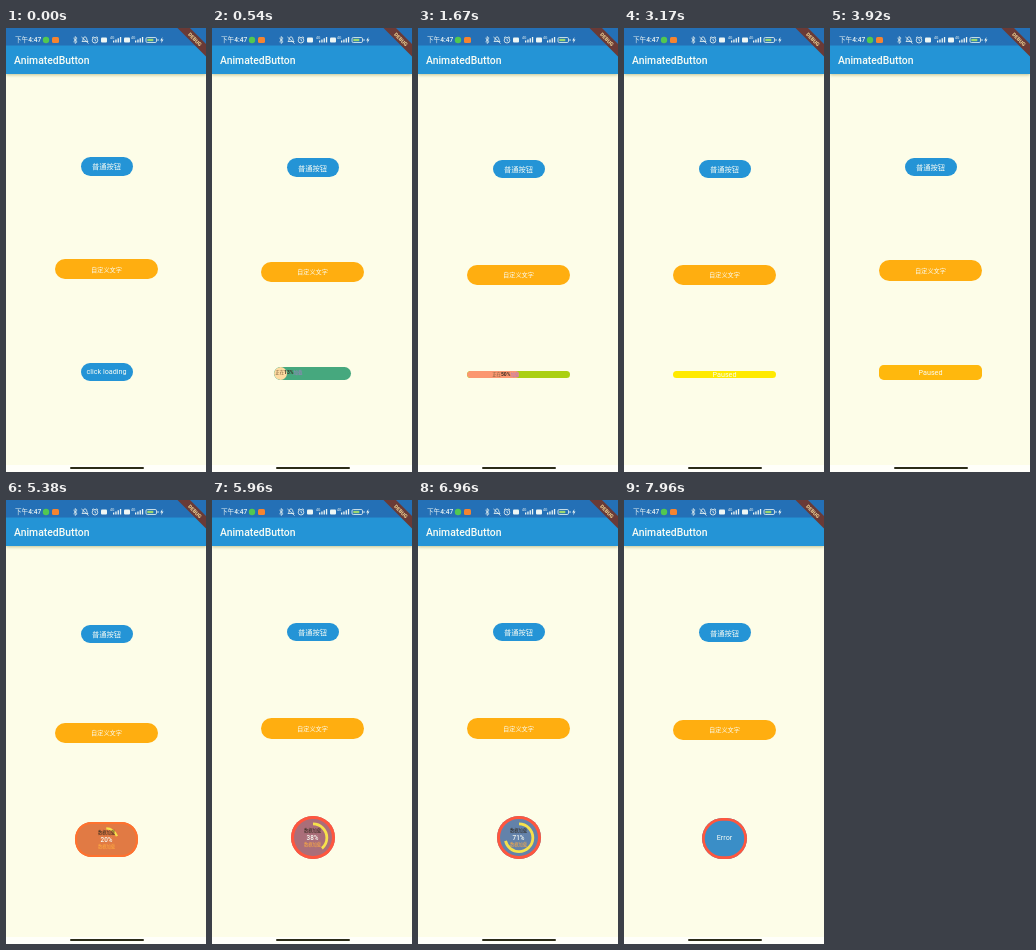
Animation of 200 by 444 pixels, one loop 8000 ms. Source, as an HTML page:

```html
<!DOCTYPE html>
<html lang="zh">
<head>
<meta charset="utf-8">
<title>AnimatedButton</title>
<style>
  html, body { margin: 0; width: 100%; height: 100%; overflow: hidden; }
  body { position: relative; background: #fdfde8; color: #f8fcf4;
    font-family: Roboto, "Noto Sans CJK SC", "Noto Sans CJK", sans-serif; }
  .bar { position: absolute; inset: 0 0 auto; height: 46px; background: #2494d6;
    box-shadow: 0 1px 3px #9a9c5899; }
  .bar svg { position: absolute; left: 0; top: 0; }
  h1 { position: absolute; left: 8px; top: 25.5px; margin: 0;
    font: 500 10.4px/14px Roboto, sans-serif; white-space: nowrap; }
  .column { position: absolute; left: 1.5px; top: 45.6px; width: 198px; height: 391px;
    display: flex; flex-direction: column; align-items: center; justify-content: space-evenly; }
  .button { position: relative; flex: none; display: grid; place-items: center;
    overflow: hidden; white-space: nowrap; }
  .plain { width: 52px; height: 18.5px; border-radius: 10px; background: #2494d6; font-size: 7.3px; }
  .custom { width: 103px; height: 20.5px; border-radius: 11px; background: #ffae10; font-size: 6.2px; }
  .label { position: absolute; left: 50%; top: 50%; transform: translate(-50%, -50%); font-size: 7.2px; line-height: 1; }
  .bar-view, .ring-view { position: absolute; inset: 0; }
  .fill { position: absolute; left: 0; top: 0; height: 100%; border-radius: 9px; }
  .caption { position: absolute; top: 50%; transform: translateY(-50%); font-size: 4.4px; line-height: 1; }
  .caption b { font-size: 5px; color: #382c20; }
  .ring-view svg { position: absolute; width: 100%; height: 100%; }
  .ring-view span { position: absolute; left: 50%; top: 50%; transform: translate(-50%, -50%); line-height: 1; }
  .nav { position: absolute; inset: auto 0 0; height: 7px; background: #fffffa; }
  .nav::after { content: ""; position: absolute; left: 64px; top: 2px; width: 74px; height: 2px;
    border-radius: 1px; background: #2c2c18; }
</style>
</head>
<body>
<div class="bar">
  <svg width="200" height="46" fill="none" stroke="#eef6f4" stroke-width=".8">
    <rect width="200" height="17.5" fill="#2470b6" stroke="none"/>
    <g fill="#eef6f4" stroke="none" font-family="Roboto, 'Noto Sans CJK SC', 'Noto Sans CJK', sans-serif">
      <text x="9" y="14.4" font-size="6.6" font-weight="500">下午4:47</text>
      <text x="104" y="11" font-size="3.5">4G</text>
      <text x="125" y="11" font-size="3.5">4G</text>
      <rect x="95" y="9.5" width="6" height="5" rx="1"/>
      <rect x="118" y="9.5" width="6" height="5" rx="1"/>
      <path id="signal" d="M107 14.5v-2h1.3v2zm2.3 0v-3h1.3v3zm2.3 0v-4.2h1.3v4.2zm2.3 0V9h1.3v5.5z"/>
      <use href="#signal" x="22"/>
      <path d="M156.5 9l-2.3 3.4h1.5l-.6 2.8 2.4-3.7h-1.5z"/>
    </g>
    <circle cx="40" cy="12" r="3.2" fill="#52c850" stroke="none"/>
    <rect x="46" y="9" width="7" height="6" rx="1.5" fill="#f58430" stroke="none"/>
    <path d="M67.5 10.2l3.6 3.4-2 1.8V8.6l2 1.8-3.6 3.4"/>
    <path d="M76 13.5c1.6-.8.7-4.7 3-4.7s1.4 3.9 3 4.7zM75.5 9l7 6.5"/>
    <circle cx="89" cy="12.2" r="2.8"/>
    <path d="M89 10.6v1.8l1.3.8M86 9.8l1.5-1.2M92 9.8l-1.5-1.2"/>
    <rect x="140" y="9.5" width="10.5" height="5" rx="1.3"/>
    <path d="M152 11v2"/>
    <rect x="141.3" y="10.8" width="6" height="2.4" fill="#9bd870" stroke="none"/>
    <path d="M171.5 0H184L200 16v12.5z" fill="#6a3a36" stroke="none"/>
    <text transform="translate(188.8 11.5) rotate(45)" y="1.7" text-anchor="middle" font-size="5.2"
      font-weight="900" font-family="Roboto, sans-serif" fill="#e8cc90" stroke="none">DEBUG</text>
  </svg>
  <h1>AnimatedButton</h1>
</div>
<div class="column">
  <div class="button plain">普通按钮</div>
  <div class="button custom">自定义文字</div>
  <div class="button" id="morph">
    <span class="label"></span>
    <div class="bar-view">
      <div class="fill"></div>
      <div class="caption"><span style="color:#80603c">正在</span><b></b><span style="color:#a878c8">加载</span></div>
    </div>
    <div class="ring-view">
      <svg viewBox="0 0 44 44"><circle cx="22" cy="22" r="14" fill="none" stroke="#f6e14c" stroke-width="2.8"
        pathLength="100" transform="rotate(-90 22 22)"/></svg>
      <span style="margin-top:-7px;font-size:4.3px;color:#30281c">数据加载</span>
      <span class="percent" style="font-size:6.4px;font-weight:500"></span>
      <span style="margin-top:7px;font-size:4.3px;color:#ffac40">数据加载</span>
    </div>
  </div>
</div>
<div class="nav"></div>
<script>
const LOOP = 8000, MORPH = 900, LOADING = 3080;
const blue = [36, 148, 214], green = [82, 182, 36], yellow = [255, 234, 0],
  amber = [255, 174, 16], red = [255, 86, 62], cream = [255, 245, 180], scarlet = [248, 60, 45];

// Each state morphs linearly from the one before; loading states shift colour with their progress.
const states = [
  { at: -MORPH, kind: 'label', text: 'click loading', size: [52, 18.3, 9.2, 0], from: blue, to: blue, edge: blue },
  { at: 110, kind: 'bar', size: [103, 7, 3.5, 0], from: green, to: yellow, edge: yellow },
  { at: 3165, kind: 'label', text: 'Paused', size: [103, 17, 5, 0], from: amber, to: amber, edge: amber },
  { at: 4765, kind: 'ring', size: [44, 43.5, 22, 3], from: red, to: blue, edge: red },
  { at: 7870, kind: 'label', text: 'Error', size: [52, 18.3, 9.2, 0], from: red, to: red, edge: red }
];

const find = s => document.querySelector(s);
const morph = find('#morph'), label = find('.label'), barView = find('.bar-view'), ringView = find('.ring-view'),
  fill = find('.fill'), caption = find('.caption'), count = find('.caption b'),
  arc = find('.ring-view circle'), percent = find('.percent');
const clamp = x => Math.min(1, Math.max(0, x));
const mix = (a, b, k) => Array.isArray(a) ? a.map((v, i) => mix(v, b[i], k)) : a + (b - a) * k;
const rgb = c => `rgb(${c.map(Math.round)})`;
const show = (el, on) => el.style.display = on ? '' : 'none';

function drawBar(p, width, height) {
  const end = Math.max(p * width, height);
  fill.style.width = end + 'px';
  fill.style.background = rgb(mix(cream, scarlet, p));
  count.textContent = Math.floor(p * 100) + '%';
  caption.style.left = Math.max(1, end - caption.offsetWidth) + 'px';
}

function drawRing(p) {
  arc.setAttribute('stroke-dasharray', `${p * 100} 200`);
  percent.textContent = Math.floor(p * 100) + '%';
}

function draw(t) {
  const i = states.findLastIndex(s => t >= s.at);
  const state = states[i], last = states[i - 1] ?? state;
  const k = clamp((t - state.at) / MORPH), p = clamp((t - state.at) / LOADING);
  const [width, height, radius, edge] = mix(last.size, state.size, k);
  const color = mix(last.to, mix(state.from, state.to, p), k);
  Object.assign(morph.style, {
    width: width + 'px', height: height + 'px', borderRadius: radius + 'px',
    background: rgb(color), boxShadow: `inset 0 0 0 ${edge}px ${rgb(mix(last.edge, state.edge, k))}`
  });
  show(label, state.kind === 'label');
  show(barView, state.kind === 'bar');
  show(ringView, state.kind === 'ring');
  if (state.kind === 'label') label.textContent = state.text;
  if (state.kind === 'bar') drawBar(p, width, height);
  if (state.kind === 'ring') drawRing(p);
}

let start;
function tick() {
  const now = performance.now();
  start ??= now;
  draw((now - start) % LOOP);
  requestAnimationFrame(tick);
}
tick();
</script>
</body>
</html>
```
